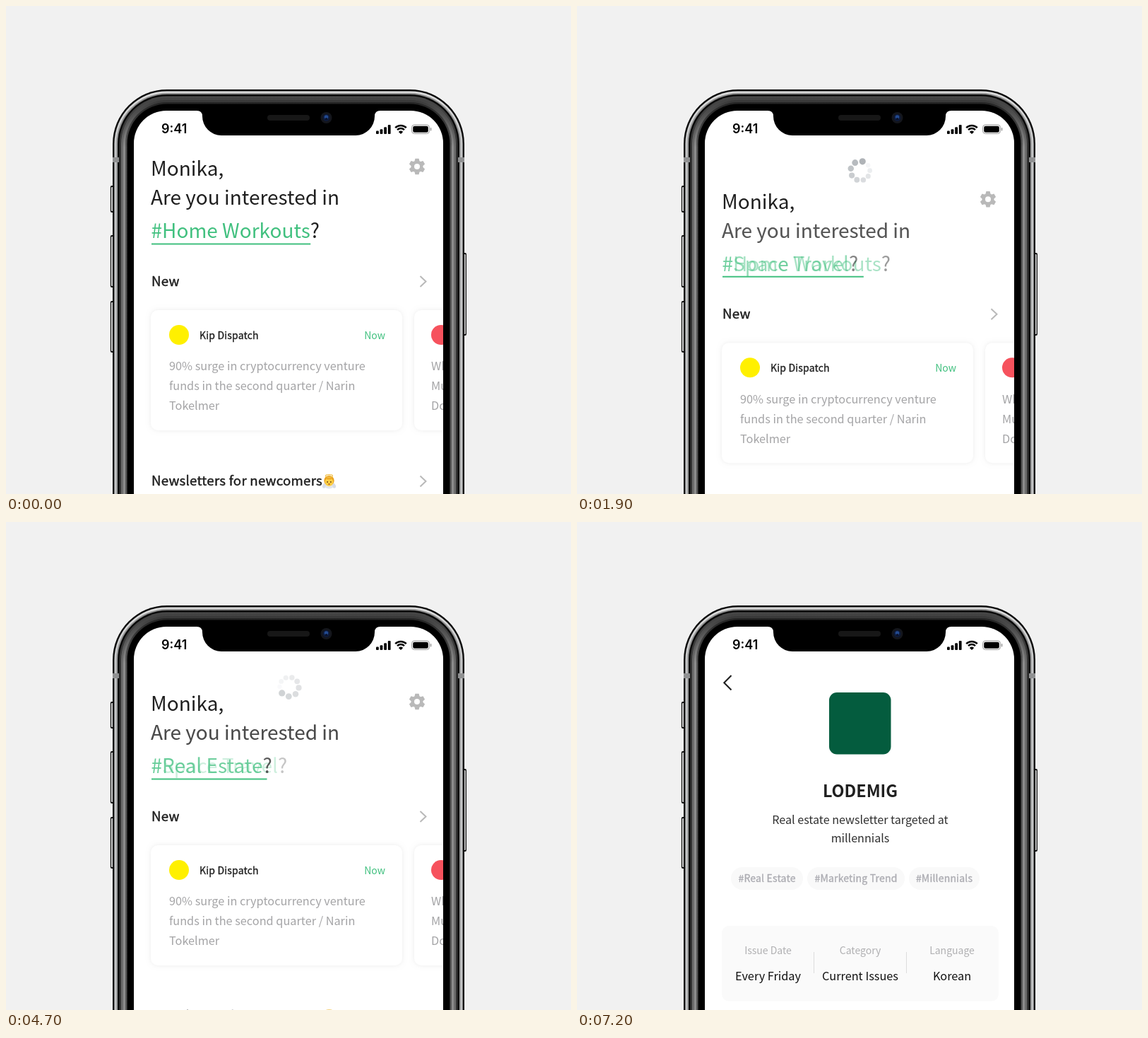
An HTML page with a canvas for the animation above (8.17 s loop, 800 px wide and 690 px high).

```html
<!DOCTYPE html>
<html lang="en">
<head>
<meta charset="utf-8">
<title>Newsletter app</title>
<style>
  html, body { margin: 0; width: 100%; height: 100%; overflow: hidden; background: #f1f1f1; }
  canvas { display: block; width: 800px; height: 690px; }
</style>
</head>
<body>
<canvas id="stage" width="800" height="690"></canvas>
<script>
const ctx = document.getElementById('stage').getContext('2d');
const LOOP = 8170, STEP = 100, PULL = 104;
const SANS = '"Noto Sans CJK KR", "Noto Sans CJK JP", "Noto Sans CJK SC", "Noto Sans CJK", "Noto Sans", sans-serif';
const INK = '#1f1f1f', GREEN = '#41c07f', GREY = '#a4a4a6', ICON = '#b9b9b9';
const TOPICS = ['#Home Workouts', '#Space Travel', '#Real Estate'];
const REFRESHES = [
  { pull: 768, release: 1668, topic: 0, spinAt: 1400, angle: 0 },
  { pull: 3468, release: 4368, topic: 1, spinAt: 3900, angle: 45 }
];
const SCREEN = { x: 181, y: 148, w: 438 };

const lerp = (a, b, p) => a + (b - a) * p;

// cubic-bezier(0, 0, .58, 1)
function easeOut(x) {
  if (x <= 0) return 0;
  if (x >= 1) return 1;
  let lo = 0, hi = 1;
  for (let i = 0; i < 24; i++) {
    const s = (lo + hi) / 2;
    if (1.74 * (1 - s) * s * s + s * s * s < x) lo = s; else hi = s;
  }
  return 3 * (1 - lo) * lo * lo + lo * lo * lo;
}

function text(str, x, y, size, color = INK, weight = 400, align = 'left', family = SANS) {
  ctx.font = `${weight} ${size}px ${family}`;
  ctx.textAlign = align;
  ctx.fillStyle = color;
  ctx.fillText(str, x, y);
  return ctx.measureText(str).width;
}

// Medium weight: the regular cut, thickened and set slightly wider
function medium(str, x, y, size, color = INK, align = 'left') {
  ctx.save();
  ctx.letterSpacing = `${size * 0.013}px`;
  const w = text(str, x, y, size, color, 400, align);
  ctx.strokeStyle = color;
  ctx.lineWidth = size * 0.025;
  ctx.lineJoin = 'round';
  ctx.strokeText(str, x, y);
  ctx.restore();
  return w;
}

function box(x, y, w, h, r, color) {
  ctx.beginPath();
  ctx.roundRect(x, y, w, h, r);
  ctx.fillStyle = color;
  ctx.fill();
}

function oval(x, y, rx, ry, color, tilt = 0) {
  ctx.beginPath();
  ctx.ellipse(x, y, rx, ry, tilt, 0, Math.PI * 2);
  ctx.fillStyle = color;
  ctx.fill();
}

const dot = (x, y, r, color) => oval(x, y, r, r, color);

function line(points, color, width) {
  ctx.beginPath();
  points.forEach(([x, y]) => ctx.lineTo(x, y));
  ctx.strokeStyle = color;
  ctx.lineWidth = width;
  ctx.stroke();
}

function faded(alpha, draw) {
  if (alpha <= 0) return;
  ctx.save();
  ctx.globalAlpha *= alpha;
  draw();
  ctx.restore();
}

// One layer of the metal rim, shaded from the top edge to the sides
function rim(inset, top, side) {
  const g = ctx.createLinearGradient(0, 122, 0, 200);
  g.addColorStop(0, top);
  g.addColorStop(1, side);
  box(151 + inset, 118 + inset, 498 - inset * 2, 700, 77 - inset, g);
}

function sideButton(x, y, h) {
  box(x, y, 6, h, 2, '#111');
  box(x + 1.2, y + 2, 3.6, h - 4, 1, '#d2d2d3');
}

function drawBody() {
  sideButton(147.8, 254, 38);
  sideButton(147.8, 324, 74);
  sideButton(147.8, 417, 73);
  sideButton(646, 349, 117);
  rim(0, '#0b0b0b', '#0b0b0b');
  rim(2.4, '#dcdcdc', '#c6c7c8');
  rim(5, '#8e8e8e', '#9c9d9e');
  rim(7, '#0a0a0a', '#0a0a0a');
  rim(9.5, '#484848', '#343434');
  rim(12, '#3c3c3c', '#6c6c6c');
  rim(15, '#2a2a2a', '#8c8c8c');
  rim(18, '#191919', '#555');
  rim(20.5, '#000', '#000');
  for (const x of [151, 640]) box(x, 214, 9, 7, 0, '#8f9091');
  box(SCREEN.x, SCREEN.y, SCREEN.w, 700, 46, '#fff');
}

function drawNotch() {
  ctx.beginPath();
  ctx.moveTo(270, 147);
  ctx.lineTo(270, 148);
  ctx.quadraticCurveTo(278, 148, 278, 156);
  ctx.arcTo(278, 183, 305, 183, 27);
  ctx.lineTo(495, 183);
  ctx.arcTo(522, 183, 522, 156, 27);
  ctx.lineTo(522, 156);
  ctx.quadraticCurveTo(522, 148, 530, 148);
  ctx.lineTo(530, 147);
  ctx.fillStyle = '#000';
  ctx.fill();
  box(370, 154, 60, 8, 4, '#171717');
  dot(453.5, 158, 8, '#14161c');
  dot(453.5, 158, 5, '#0d1a3a');
  dot(453.5, 157, 2.8, '#234a8f');
  dot(453.5, 159.5, 1.5, '#0a1026');
}

function drawStatus() {
  text('9:41', 220, 180.4, 18, '#000', 600, 'left', 'Inter, sans-serif');
  [4.5, 6.8, 9.8, 13].forEach((h, i) => box(524 + i * 5.6, 181 - h, 3.8, h, 1, '#000'));
  ctx.strokeStyle = '#000';
  ctx.lineWidth = 2.5;
  for (const r of [7, 11]) {
    ctx.beginPath();
    ctx.arc(559, 180, r, -Math.PI * 0.75, -Math.PI * 0.25);
    ctx.stroke();
  }
  ctx.beginPath();
  ctx.moveTo(559, 181);
  ctx.arc(559, 181, 4.4, -Math.PI * 0.75, -Math.PI * 0.25);
  ctx.fillStyle = '#000';
  ctx.fill();
  ctx.beginPath();
  ctx.roundRect(574.5, 168, 25, 12.5, 3.8);
  ctx.strokeStyle = '#999';
  ctx.lineWidth = 1;
  ctx.stroke();
  box(576.2, 169.7, 21.6, 9.1, 2.3, '#000');
  box(600.8, 172, 1.5, 4.5, 1, '#999');
}

function drawGear(x, y) {
  ctx.beginPath();
  for (let i = 0; i < 6; i++) {
    for (const [deg, r] of [[-24, 8.5], [-13, 11.6], [13, 11.6], [24, 8.5]]) {
      const a = (i * 60 - 90 + deg) * Math.PI / 180;
      ctx.lineTo(x + r * Math.cos(a), y + r * Math.sin(a));
    }
  }
  ctx.closePath();
  ctx.moveTo(x + 4, y);
  ctx.arc(x, y, 4, 0, Math.PI * 2);
  ctx.fillStyle = ICON;
  ctx.fill('evenodd');
}

function chevron(y) {
  line([[586.5, y - 7.5], [594.5, y], [586.5, y + 7.5]], ICON, 2);
}

function drawAngel(x, y) {
  oval(x - 6.5, y + 6, 2.6, 4, '#d8dde6', 0.5);
  oval(x + 6.5, y + 6, 2.6, 4, '#d8dde6', -0.5);
  oval(x, y - 1, 7.2, 7, '#e9a11f');
  oval(x, y + 8, 5.5, 2.6, '#e3e6ec');
  oval(x, y + 1, 5.8, 6, '#ffcf45');
  oval(x, y - 4.5, 4.5, 2, '#eeaa26');
  for (const s of [-1, 1]) dot(x + s * 2.4, y + 1, 0.9, '#5b3a12');
  oval(x, y + 4, 1.7, 0.8, '#a2501b');
  ctx.beginPath();
  ctx.ellipse(x, y - 7.5, 5, 1.8, 0, 0, Math.PI * 2);
  ctx.strokeStyle = '#f2c14a';
  ctx.lineWidth = 1.2;
  ctx.stroke();
}

function card(x, inset, color, lines) {
  ctx.save();
  ctx.shadowColor = 'rgba(0,0,0,.075)';
  ctx.shadowBlur = 6;
  box(x, 430, 356, 170, 10, '#fff');
  ctx.restore();
  dot(x + inset + 14, 465, 14, color);
  lines.forEach((s, i) => text(s, x + inset, 515.4 + i * 28, 16.3, GREY));
}

function question(topic) {
  text('Are you interested in', 205, 281.4, 28);
  const w = text(TOPICS[topic], 205.5, 328.4, 28, GREEN);
  text('?', 205.5 + w, 328.4, 28);
}

function topicWidth(topic) {
  ctx.font = `400 28px ${SANS}`;
  return ctx.measureText(TOPICS[topic]).width;
}

function drawHome({ from, to, mix, shift }) {
  ctx.save();
  ctx.translate(0, shift);
  text('Monika,', 205, 240.4, 28);
  drawGear(582, 227);
  faded(1 - mix, () => question(from));
  faded(mix, () => question(to));
  box(206, 335.4, lerp(topicWidth(from), topicWidth(to), mix), 2, 0, GREEN);
  medium('New', 206, 396, 18.67);
  chevron(389.5);
  card(205, 26, '#fff000', ['90% surge in cryptocurrency venture', 'funds in the second quarter / Narin', 'Tokelmer']);
  medium('Kip Dispatch', 274, 471, 14);
  text('Now', 537, 471, 14, GREEN, 400, 'right');
  card(578, 24, '#f6525d', ['Why', 'Mus', 'Do']);
  medium('Newsletters for newcomers', 206, 678.4, 18.67);
  drawAngel(457.5, 672);
  chevron(672);
  ctx.restore();
}

// Nine dots that shrink and pale away from the leading one
function drawSpinner(angle) {
  for (let i = 8; i >= 0; i--) {
    const a = (angle - 47 * i + 0.9 * i * i) * Math.PI / 180, p = i / 8;
    const shade = [lerp(76, 230, p), lerp(86, 232, p), lerp(94, 237, p)].map(Math.round);
    dot(401 + 13.6 * Math.cos(a), 233 + 13.6 * Math.sin(a), lerp(4.6, 3.2, p), `rgb(${shade})`);
  }
}

function drawDetail() {
  line([[218.5, 217], [208.3, 227.3], [218.5, 237.6]], INK, 2.1);
  box(357, 241, 87.5, 87.5, 11, '#045c3e');
  text('LODEMIG', 401, 389, 23.4, INK, 700, 'center');
  text('Real estate newsletter targeted at', 401, 427.4, 16.1, '#303030', 400, 'center');
  text('millennials', 401, 453.4, 16.1, '#303030', 400, 'center');
  for (const [label, x, w] of [['#Real Estate', 218, 102], ['#Marketing Trend', 326, 138], ['#Millennials', 470, 100]]) {
    box(x, 488, w, 32, 16, '#f9f9f9');
    medium(label, x + w / 2, 509.4, 14, '#acacb2', 'center');
  }
  box(205, 571, 392, 106.5, 10, '#fafafa');
  for (const [label, value, x] of [['Issue Date', 'Every Friday', 270.5], ['Category', 'Current Issues', 401], ['Language', 'Korean', 531]]) {
    text(label, x, 611.4, 14, '#b0b0b2', 400, 'center');
    text(value, x, 648.4, 16.3, '#111', 400, 'center');
  }
  for (const x of [335, 466]) box(x, 608, 1, 30, 0, '#dcdcdc');
}

// Draws one screen-wide page, slid sideways and cut at its own edges
function page(dx, draw) {
  ctx.save();
  ctx.translate(dx, 0);
  ctx.beginPath();
  ctx.rect(SCREEN.x, SCREEN.y, SCREEN.w, 700);
  ctx.clip();
  draw();
  ctx.restore();
}

function draw(t) {
  const state = { from: 0, to: 0, mix: 0, shift: 0 };
  let spin = { angle: 0, alpha: 0 };
  for (const r of REFRESHES) {
    if (t < r.pull) continue;
    const back = easeOut((t - r.release) / 600);
    const open = easeOut((t - r.pull) / 400) * (1 - back);
    Object.assign(state, { from: r.topic, to: r.topic + 1, mix: back, shift: PULL * open });
    spin = { angle: r.angle + (t - r.spinAt) * 0.5675, alpha: open };
  }
  const push = easeOut((t - 6150) / 550) * SCREEN.w;

  ctx.fillStyle = '#f1f1f1';
  ctx.fillRect(0, 0, 800, 690);
  drawBody();
  ctx.save();
  ctx.beginPath();
  ctx.roundRect(SCREEN.x, SCREEN.y, SCREEN.w, 700, 46);
  ctx.clip();
  if (push < SCREEN.w) {
    page(-push, () => {
      drawHome(state);
      faded(spin.alpha, () => drawSpinner(spin.angle));
    });
  }
  if (push > 0) page(SCREEN.w - push, drawDetail);
  ctx.restore();
  drawNotch();
  drawStatus();
}

const start = performance.now();
function tick() {
  const t = (performance.now() - start) % LOOP;
  draw(Math.floor(t / STEP) * STEP);
  requestAnimationFrame(tick);
}
tick();
</script>
</body>
</html>
```
